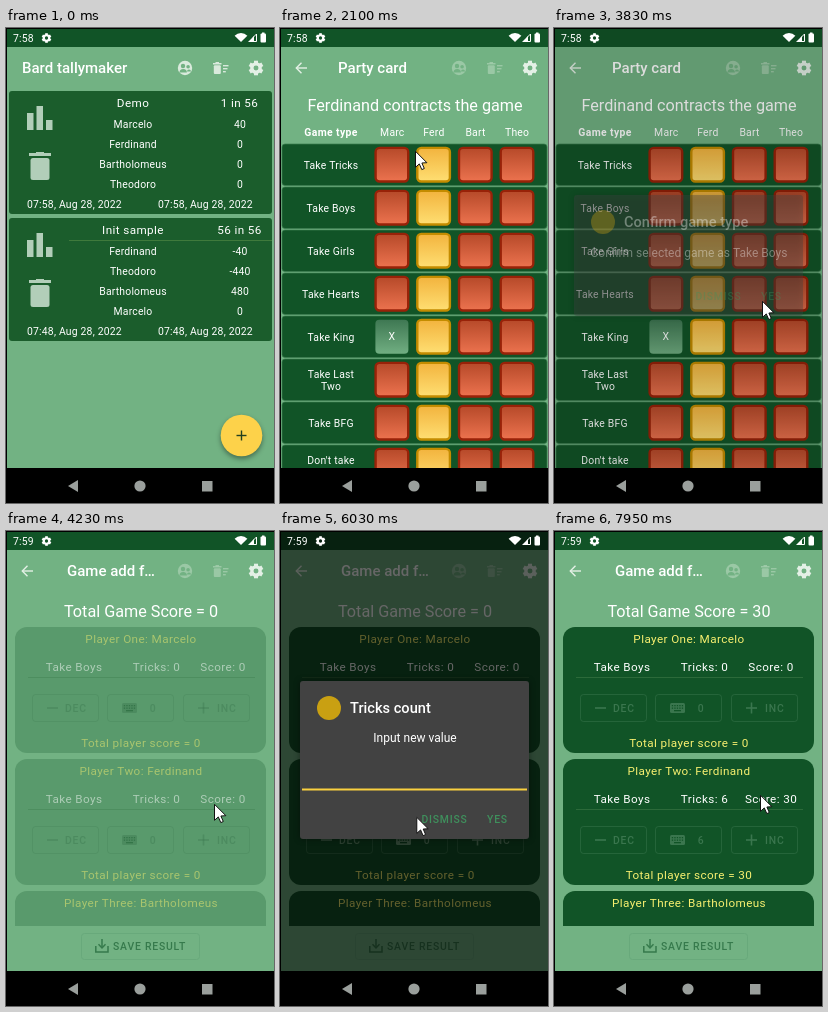
An HTML page with a canvas for the animation above (8000 ms loop, 268 by 475 pixels).

```html
<!DOCTYPE html>
<html lang="en">
<head>
<meta charset="utf-8">
<title>Score keeper</title>
<style>
html, body { margin: 0; width: 100%; height: 100%; overflow: hidden; background: #000; }
canvas { display: block; width: 100%; height: 100%; }
</style>
</head>
<body>
<canvas id="stage"></canvas>
<script>
const W = 268, H = 475, LOOP = 8000;
const canvas = document.getElementById('stage');
const ctx = canvas.getContext('2d');
const dpr = window.devicePixelRatio || 1;
canvas.width = W * dpr;
canvas.height = H * dpr;

const BG = '#72b283', DARK = '#115427', CARD = '#1b5d2c', PALE = '#b2ceb9', YELLOW = '#f8f070';
const PLAYERS = ['Marcelo', 'Ferdinand', 'Bartholomeus', 'Theodoro'];
const ORDINALS = ['One', 'Two', 'Three'];
const GAMES = ['Take Tricks', 'Take Boys', 'Take Girls', 'Take Hearts', 'Take King',
  'Take Last|Two', 'Take BFG', "Don't take|Tricks"];

// start time, end time, destination
const START = [196, 422];
const MOVES = [
  [440, 960, 135, 123], [2100, 2560, 150, 171], [3300, 3650, 208, 273],
  [4630, 4960, 147, 310], [5700, 5900, 138, 294], [5970, 6360, 112, 173],
  [6850, 7200, 206, 282], [7650, 7940, 206, 264]
];

const ramp = (t, a, b) => Math.min(1, Math.max(0, (t - a) / (b - a)));
const ease = p => p * p * (3 - 2 * p);
const mix = (a, b, p) => a + (b - a) * p;

function fade(alpha, draw) {
  if (alpha <= 0) return;
  ctx.save();
  ctx.globalAlpha *= alpha;
  draw();
  ctx.restore();
}

function rect(x, y, w, h, color) {
  ctx.fillStyle = color;
  ctx.fillRect(x, y, w, h);
}

function roundPath(x, y, w, h, r) {
  ctx.beginPath();
  ctx.roundRect(x, y, w, h, r);
}

function box(x, y, w, h, r, color) {
  roundPath(x, y, w, h, r);
  ctx.fillStyle = color;
  ctx.fill();
}

function frame(x, y, w, h, r, color, width = 1) {
  roundPath(x, y, w, h, r);
  ctx.strokeStyle = color;
  ctx.lineWidth = width;
  ctx.stroke();
}

function disc(x, y, r, color) {
  ctx.beginPath();
  ctx.arc(x, y, r, 0, 7);
  ctx.fillStyle = color;
  ctx.fill();
}

function poly(points, color) {
  ctx.beginPath();
  points.forEach(([x, y]) => ctx.lineTo(x, y));
  ctx.closePath();
  ctx.fillStyle = color;
  ctx.fill();
}

function line(points, color, width) {
  ctx.beginPath();
  points.forEach(([x, y], i) => i ? ctx.lineTo(x, y) : ctx.moveTo(x, y));
  ctx.strokeStyle = color;
  ctx.lineWidth = width;
  ctx.stroke();
}

// y is the middle of the capitals
function text(s, x, y, size, { color = '#fff', align = 'center', weight = 400, gap = 0 } = {}) {
  ctx.font = `${weight} ${size}px Roboto, sans-serif`;
  ctx.letterSpacing = gap + 'px';
  ctx.textAlign = align;
  ctx.fillStyle = color;
  ctx.fillText(s, x, y + size * 0.36);
}
const small = (s, x, y, opt) => text(s, x, y, 10.4, { gap: 0.2, ...opt });
const large = (s, x, y, opt) => text(s, x, y, 11.7, { gap: 0.4, ...opt });
const button = (s, x, y, color, align = 'left') =>
  text(s, x, y, 10.4, { color, align, weight: 500, gap: 0.8 });

function gear(x, y, r, color) {
  ctx.beginPath();
  ctx.arc(x, y, r * 0.57, 0, 7);
  ctx.strokeStyle = color;
  ctx.lineWidth = r * 0.46;
  ctx.stroke();
  for (let i = 0; i < 6; i++) {
    const a = i * Math.PI / 3 + Math.PI / 6, c = Math.cos(a), s = Math.sin(a);
    line([[x + c * r * 0.6, y + s * r * 0.6], [x + c * r, y + s * r]], color, r * 0.55);
  }
}

// disc with two heads and shoulders cut out
function people(x, y, color) {
  const cut = (dx, dy, r, from = 0, to = Math.PI * 2) => {
    ctx.moveTo(x + dx + r * Math.cos(from), y + dy + r * Math.sin(from));
    ctx.arc(x + dx, y + dy, r, from, to);
    ctx.closePath();
  };
  ctx.beginPath();
  cut(0, 0, 7.2);
  cut(-2, -2, 2.2);
  cut(3.1, -1.3, 1.8);
  cut(-1.8, 4.6, 3.7, Math.PI, Math.PI * 2);
  cut(4, 3.6, 2, Math.PI, Math.PI * 2);
  ctx.fillStyle = color;
  ctx.fill('evenodd');
}

function ripple(x, y, r, color, clip) {
  ctx.save();
  roundPath(...clip);
  ctx.clip();
  disc(x, y, r, color);
  ctx.restore();
}

function statusIcons(t) {
  small(t < 3900 ? '7:58' : '7:59', 7, 10, { align: 'left' });
  gear(40.5, 10, 4.8, '#fff');
  ctx.beginPath();
  ctx.moveTo(235, 14);
  ctx.arc(235, 14, 9, -Math.PI * 0.75, -Math.PI * 0.25);
  ctx.fillStyle = '#fff';
  ctx.fill();
  poly([[248, 8], [248, 14], [242, 14]], '#fff');
  line([[248, 13.5], [250.5, 13.5], [250.5, 6], [247, 9.5]], '#fff', 1);
  rect(256, 4.5, 2.5, 1.5, '#fff');
  box(254.5, 5.5, 5.5, 9, 1, '#fff');
}

function navBar() {
  const c = '#9a9f9c';
  rect(0, 440, W, 35, '#000');
  poly([[62, 458], [72, 452], [72, 464]], c);
  disc(134, 458, 5.6, c);
  rect(196, 453, 10.5, 10.5, c);
}

function toolbar(t) {
  const opened = ramp(t, 1180, 1400), c = '#e4f0e6';
  if (t < 1250) text('Bard tallymaker', 16, 40, 15, { align: 'left', weight: 500 });
  else if (t < 3900) text('Party card', 58, 40, 15, { align: 'left', weight: 500 });
  else text('Game add f…', 61, 40, 15, { align: 'left', weight: 500 });
  fade(opened, () => {
    line([[27, 40], [16.5, 40]], c, 1.4);
    line([[21.5, 34.8], [16.3, 40], [21.5, 45.2]], c, 1.4);
  });
  fade(mix(0.9, 0.35, opened), () => {
    people(179, 40, c);
    rect(207, 35, 8.5, 1.5, c);
    rect(209.5, 34, 3.5, 1.2, c);
    box(207.8, 37.2, 7, 8.8, 1, c);
    rect(217, 37, 5.5, 1.4, c);
    rect(217, 40, 4.5, 1.4, c);
    rect(217, 43, 2.8, 1.4, c);
  });
  gear(250, 40, 7.3, c);
}

function partyItem(y, title, count, order, scores, time) {
  box(3, y, 263, 123, 3, CARD);
  rect(21, y + 22, 6.5, 17, PALE);
  rect(30.5, y + 15, 6.5, 24, PALE);
  rect(40, y + 29, 6.5, 10, PALE);
  rect(30, y + 61, 8, 2, PALE);
  rect(23, y + 62, 22, 3, PALE);
  box(24.5, y + 67, 19, 22, 2.5, PALE);
  large(title, 127, y + 11.5);
  large(count, 233.5, y + 11.5);
  order.forEach((p, i) => {
    small(PLAYERS[p], 127, y + 33 + i * 20);
    small(String(scores[i]), 234, y + 33 + i * 20);
  });
  const date = time + ', Aug 28, 2022';
  small(date, 21, y + 113, { align: 'left' });
  small(date, 152, y + 113, { align: 'left' });
}

function home(t) {
  partyItem(63, 'Demo', '1 in 56', [0, 1, 2, 3], [40, 0, 0, 0], '07:58');
  partyItem(190, 'Init sample', '56 in 56', [1, 3, 2, 0], [-40, -440, 480, 0], '07:48');
  rect(63, 212, 203, 1, '#3f7a3c');
  if (t > 990) {
    const r = mix(12, 125, ramp(t, 1130, 1370));
    ripple(134.5, 124, r, 'rgba(255,214,90,0.22)', [3, 63, 263, 123, 3]);
  }
  ctx.save();
  ctx.shadowColor = 'rgba(0,0,0,0.4)';
  ctx.shadowBlur = 5 * dpr;
  ctx.shadowOffsetY = 2.5 * dpr;
  disc(235.5, 407.5, 20.8, '#fdd24a');
  ctx.restore();
  line([[230.5, 407.5], [240.5, 407.5]], '#24401f', 1.4);
  line([[235.5, 402.5], [235.5, 412.5]], '#24401f', 1.4);
}

function cell(x, y, top, bottom, edge) {
  const g = ctx.createLinearGradient(0, y, 0, y + 36);
  g.addColorStop(0, top);
  g.addColorStop(1, bottom);
  box(x + 1, y + 1, 33, 34, 4, g);
  if (edge) frame(x + 1.2, y + 1.2, 32.6, 33.6, 4, edge, 2.4);
}

function party(t) {
  text(PLAYERS[1] + ' contracts the game', 135, 77, 16.2);
  small('Game type', 51, 104.6, { weight: 600, gap: 0.4 });
  PLAYERS.forEach((p, i) => small(p.slice(0, 4), 112.3 + i * 41.6, 104));
  GAMES.forEach((name, row) => {
    const y = 116 + row * 43;
    box(2, y, 265, 41.5, 3, DARK);
    frame(2, y, 265, 41.5, 3, '#3a7c4f', 0.7);
    const lines = name.split('|');
    lines.forEach((s, i) => small(s, 51, y + 21.5 + (i - (lines.length - 1) / 2) * 12.5));
    for (let col = 0; col < 4; col++) {
      const x = 94.4 + col * 41.7, cy = y + 2.7;
      if (row === 4 && col === 0) {
        cell(x, cy, '#3d7651', '#72b083');
        small('X', x + 17.5, cy + 18);
      } else if (col === 1) cell(x, cy, '#f2b23c', '#ffe074', '#c48c00');
      else cell(x, cy, '#b44828', '#ee7450', '#982208');
    }
  });
  if (t > 2700 && t < 2970) {
    ripple(150, 171, mix(8, 12, ramp(t, 2700, 2760)), 'rgba(80,60,0,0.18)', [137, 163, 33, 34, 4]);
  }
}

function stepButtons(y, count, enabled, t) {
  const c = `rgb(${mix(58, 108, enabled)},${mix(118, 155, enabled)},${mix(78, 120, enabled)})`;
  fade(mix(0.5, 0.35, enabled), () =>
    [26, 101, 177].forEach(x => frame(x + 0.5, y - 13.5, 66, 27, 3, c)));
  line([[41, y], [52, y]], c, 1.6);
  button('DEC', 59, y, c);
  box(116, y - 5, 15, 10, 1.5, c);
  for (let i = 0; i < 5; i++) {
    rect(117.8 + i * 2.5, y - 3, 1.3, 1.3, DARK);
    rect(117.8 + i * 2.5, y - 0.5, 1.3, 1.3, DARK);
  }
  rect(120, y + 2, 7, 1.3, DARK);
  button(String(count), 147, y, c, 'center');
  line([[192, y], [203, y]], c, 1.6);
  line([[197.5, y - 5.5], [197.5, y + 5.5]], c, 1.6);
  button('INC', 211, y, c);
  if (y > 300 && t > 4990 && t < 5370) {
    ripple(147, 310, mix(12, 50, ramp(t, 5130, 5350)), 'rgba(180,220,190,0.13)',
      [101, y - 13.5, 67, 27, 3]);
  }
}

function game(t) {
  const saved = t >= 7650;
  let shown = t < 4230 ? 0 : mix(0.25, 1, ramp(t, 4230, 4360));
  if (saved) shown = mix(0.25, 1, ramp(t, 7650, 7900));
  const enabled = saved ? 0 : ramp(t, 4230, 4360);

  text('Total Game Score = ' + (saved ? 30 : 0), 135, 80, 16.2);
  ctx.save();
  ctx.beginPath();
  ctx.rect(0, 90, W, 305);
  ctx.clip();
  ORDINALS.forEach((nth, i) => {
    const y = 96 + i * 132, tricks = saved && i === 1 ? 6 : 0, score = tricks * 5;
    fade(shown, () => {
      box(9, y, 251, 126, 12, DARK);
      rect(22, y + 50, 227, 1, '#2c6a3a');
    });
    fade(Math.sqrt(shown), () => {
      large(`Player ${nth}: ${PLAYERS[i]}`, 135, y + 12, { color: YELLOW });
      large('Take Boys', 68, y + 40);
      large('Tricks: ' + tricks, 150.5, y + 40);
      large('Score: ' + score, 217, y + 40);
      large('Total player score = ' + score, 135, y + 116, { color: YELLOW });
    });
    fade(shown && Math.max(0.4, shown), () => stepButtons(y + 81, tricks, enabled, t));
  });
  ctx.restore();

  const c = '#367a4c';
  frame(75.5, 402.5, 118, 26, 3, '#68a97b');
  line([[89.8, 415], [89.8, 421], [102, 421], [102, 415]], c, 1.5);
  line([[96, 408], [96, 416.5]], c, 1.5);
  line([[92.5, 413.3], [96, 417], [99.5, 413.3]], c, 1.5);
  button('SAVE RESULT', 107, 415.5, c);
}

function dialog(top, height, title, body, bodyY) {
  ctx.save();
  ctx.shadowColor = 'rgba(0,0,0,0.4)';
  ctx.shadowBlur = 6 * dpr;
  box(20, top, 229, height, 3, '#424242');
  ctx.restore();
  disc(49, top + 27, 12, '#c9a012');
  text(title, 70, top + 27, 14.6, { align: 'left', weight: 500 });
  text(body, 135, bodyY, 12);
  const y = top + height - 20;
  button('DISMISS', 164.5, y, '#3f8f5c', 'center');
  button('YES', 217.5, y, '#3f8f5c', 'center');
}

function confirmBox() {
  dialog(167, 121, 'Confirm game type', 'Confirm selected game as Take Boys', 225);
}

function inputBox(t) {
  dialog(150, 158, 'Tricks count', 'Input new value', 207);
  const focus = ramp(t, 5430, 5650);
  rect(22, 258, 225, 1, '#e0e0e0');
  rect(mix(134, 22, focus), 257.5, 225 * focus, 2, '#f9d03f');
  if (t > 6600) text('6', 22, 248.5, 13, { align: 'left' });
}

// dims the screen below and shows the box above it
function modal(t, open, close, draw) {
  if (t < open) return;
  const k = mix(0.25, 1, ramp(t, open, open + 130)) * (1 - ramp(t, close, close + 170));
  if (k <= 0) return;
  rect(1, 1, 267, 439, `rgba(0,0,0,${0.6 * k})`);
  fade(Math.min(1, k * 1.6), draw);
}

function pointer(t) {
  if (t < 440) return;
  let [x, y] = START;
  for (const [a, b, tx, ty] of MOVES) {
    const p = ease(ramp(t, a, b));
    x = mix(x, tx, p);
    y = mix(y, ty, p);
  }
  const shape = [[0, 0], [0, 16], [3.8, 12.6], [6.3, 18.3], [8.8, 17.2], [6.4, 11.7], [11.4, 11.4]];
  ctx.save();
  ctx.translate(x + 0.5, y + 0.3);
  ctx.lineJoin = 'round';
  poly(shape, '#fff');
  ctx.strokeStyle = '#111';
  ctx.lineWidth = 1;
  ctx.stroke();
  ctx.restore();
}

function render(t) {
  ctx.setTransform(dpr, 0, 0, dpr, 0, 0);
  rect(0, 0, W, H, '#000');
  rect(1, 1, 267, 439, BG);
  const toParty = ramp(t, 1430, 1690), toGame = ramp(t, 3880, 4090);
  fade(1 - toParty, () => home(t));
  fade(toParty * (1 - toGame), () => party(t));
  fade(toGame, () => game(t));
  toolbar(t);
  rect(1, 1, 267, 18, DARK);
  modal(t, 2970, 3700, confirmBox);
  modal(t, 5370, 7420, () => inputBox(t));
  statusIcons(t);
  navBar();
  pointer(t);
}

function tick() {
  render(performance.now() % LOOP);
  requestAnimationFrame(tick);
}
tick();
</script>
</body>
</html>
```
